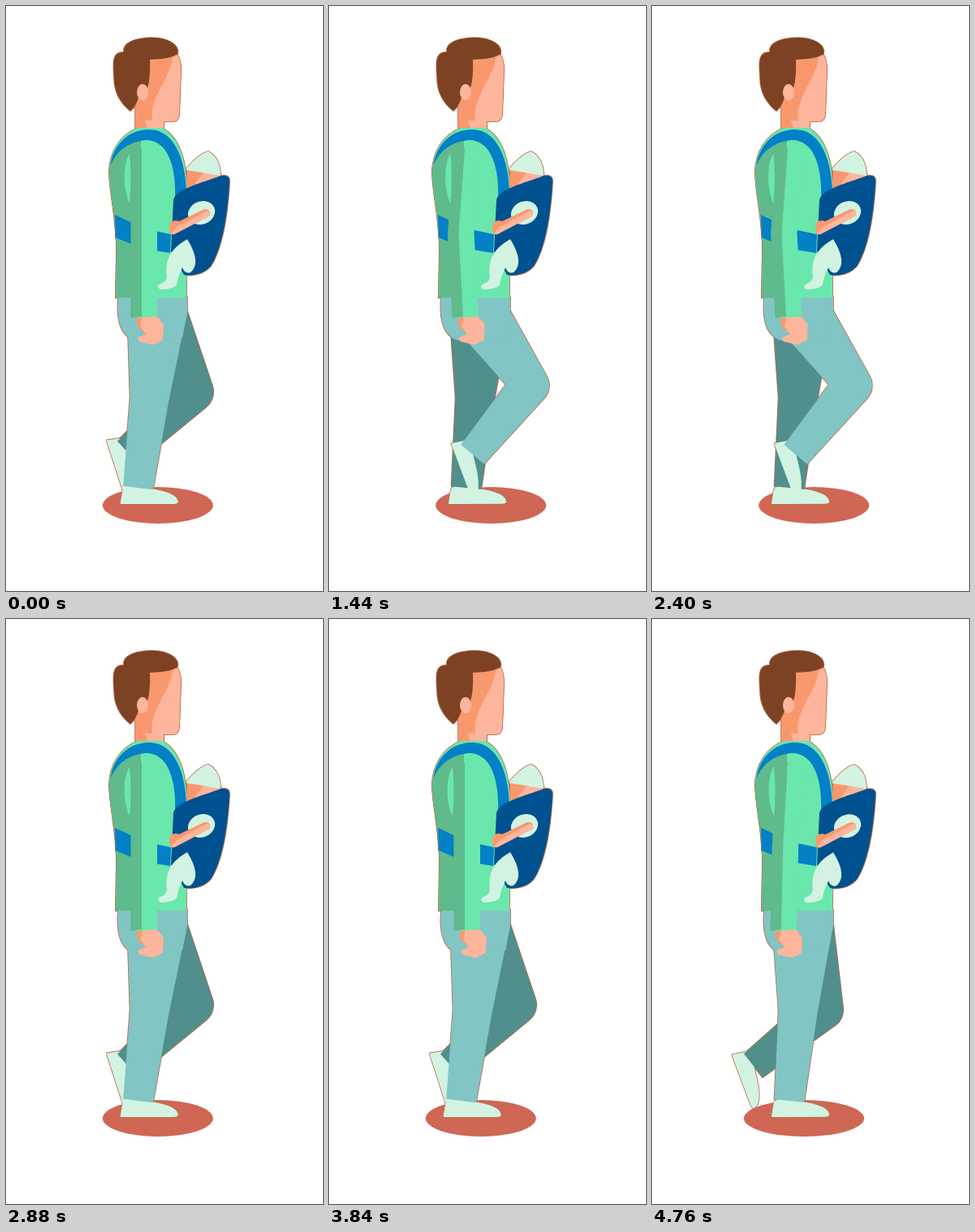
Recreate the animation shown at these times as an HTML page with a canvas. Size 390 px wide and 720 px high, loop 4.8 s.

```html
<!DOCTYPE html>
<html lang="en">
<head>
<meta charset="utf-8">
<title>Walking with a baby carrier</title>
<style>
html, body { margin: 0; width: 100%; height: 100%; overflow: hidden; background: #fff; }
canvas { display: block; }
</style>
</head>
<body>
<canvas id="stage" width="390" height="720"></canvas>
<script>
const ctx = document.getElementById('stage').getContext('2d');
const CYCLE = 960, STEP = 40;
const HIP_X = 190, HIP_Y = 375, BONE = 109.2, KNEE = 24, ANKLE = 18.5;
const SKIN = '#fdb59c', SKIN_SHADE = '#f9986d', HAIR = '#7d4224';
const GREEN = '#6ae7ac', GREEN_SHADE = '#5fba8c', MINT = '#d2f3e2';
const STRAP = '#0380c6', NAVY = '#00518f', TROUSERS = '#81c5c4', TROUSERS_SHADE = '#508f8c';
const FLOOR = '#cf6754', EDGE = '#b9714f';
const { sin, cos, max, sqrt, hypot, PI } = Math;

const shape = (color, d) => ({ color, path: new Path2D(d) });
const oval = (color, x, y, rx, ry, turn = 0) => {
  const path = new Path2D();
  path.ellipse(x, y, rx, ry, turn, 0, 2 * PI);
  return { color, path };
};
const moved = (item, matrix) => {
  const path = new Path2D();
  path.addPath(item.path, matrix);
  return { color: item.color, path };
};

const shoe = shape(MINT, 'M-22 19L-19 2Q-16-2-12-2L14 1Q46 5 49 16Q50 20 43 20H-20Q-22 20-22 19Z');

const pelvis = shape(TROUSERS, 'M138 358H223V378L217 408L167 413Q133 411 138 358Z');

const torso = [
  shape(GREEN, 'M162 150C140 159 127 180 127 205C128 235 136 260 136 300L135 359H222V240C225 190 212 160 192 150Z'),
  shape(GREEN_SHADE, 'M166 156C140 163 127 182 127 205C128 235 136 260 136 300L135 359H166Z'),
  shape(STRAP, 'M134 257L166 272V298L135 285Z'),
  shape(STRAP, 'M165 273L203 281L202 304L165 298Z'),
  shape(STRAP, 'M129 196C131 172 150 152 176 152C206 152 223 187 222 240H208C210 195 198 165 172 165C152 167 136 177 129 196Z')
];

const head = [
  shape(SKIN_SHADE, 'M158 70L207 58Q215 65 215 78L213 134Q212 142 205 142H194V151Q177 153 159 150V122Z'),
  shape(SKIN, 'M205 64L211 60Q215 66 215 78L213 134Q212 142 205 142H194V151L174 150L171 141H180C176 112 201 92 205 64Z'),
  shape(HAIR, 'M153 129C139 118 133 103 133 88C133 77 128 56 145 57C143 45 160 39 180 39C199 39 214 48 211 59C200 66 187 65 177 66Q178 88 174 101L163 112Q161 122 153 129Z'),
  oval(SKIN, 168, 106, 7, 10)
];

const baby = [
  shape(SKIN_SHADE, 'M223 200L264 207L250 225H222Z'),
  shape(SKIN, 'M243 205L264 207L250 225H228Z'),
  shape(MINT, 'M222 200Q238 181 249 179Q264 187 264 209Q244 205 222 202Z'),
  shape(NAVY, 'M206 238C210 225 240 218 264 209Q276 207 275 217C273 251 267 297 252 320Q241 333 219 331L203 302Z'),
  oval(MINT, 240.5, 254.5, 17, 14, -0.4),
  shape(SKIN_SHADE, 'M202 267Q207 262 213 265L244 250Q252 249 251 258L207 281Q199 283 202 267Z'),
  shape(SKIN, 'M203 280L210 272L247 252Q252 252 251 258L207 281Z'),
  shape(MINT, 'M223 287Q241 316 227 328Q220 330 217 322Q211 334 210 343Q207 348 190 349Q184 345 190 342Q197 340 198 333C195 310 205 297 223 287Z')
];

const hand = [
  shape(SKIN, 'M164 382L184 380L194 392L193 411L181 417L164 413L162 408L172 404L164 394Z'),
  shape(SKIN_SHADE, 'M160 382H168L165 394L172 404L162 395Z')
];

const highlight = shape(GREEN, 'M152 182C144 192 143 225 152 243Q155 210 152 182Z');

// Smooth hump of the stride, peaking at the given angle in degrees.
const lobe = (angle, peak, stretch) => max(0, cos(stretch * (angle - peak * PI / 180)));

// Ankle position and foot tilt; angle runs from 0 to 2 PI, mid-stance at 0.
function ankle(angle) {
  return {
    x: 166 - 64 * sin(angle) - 7 * cos(angle) + 20 * sin(2 * angle) + 3.6 * cos(2 * angle),
    y: 593 - 44 * lobe(angle, 160, 0.86) ** 1.5,
    tilt: 72 * lobe(angle, 165, 1) - 15 * max(0, -sin(angle)) ** 3
  };
}

function leg(angle, color) {
  const { x, y, tilt } = ankle(angle);
  const dx = x - HIP_X, dy = y - HIP_Y, reach = hypot(dx, dy);
  const bend = sqrt(max(0, BONE ** 2 - reach ** 2 / 4)) / reach;
  const kx = HIP_X + dx / 2 + dy * bend, ky = HIP_Y + dy / 2 - dx * bend;

  const normal = (vx, vy) => [vy / hypot(vx, vy), -vx / hypot(vx, vy)];
  const [tx, ty] = normal(kx - HIP_X, ky - HIP_Y), [sx, sy] = normal(x - kx, y - ky);
  const miter = 2 * KNEE / ((tx + sx) ** 2 + (ty + sy) ** 2);
  const mx = (tx + sx) * miter, my = (ty + sy) * miter;
  const ux = sx * ANKLE, uy = sy * ANKLE;

  const path = new Path2D();
  path.moveTo(223, HIP_Y);
  path.arcTo(kx + mx, ky + my, x + ux, y + uy, KNEE);
  path.lineTo(x + ux, y + uy);
  path.lineTo(x - ux, y - uy);
  path.lineTo(kx - mx, ky - my);
  path.lineTo(150 + max(0, kx - 180) * 0.18, 404);
  path.closePath();

  const place = new DOMMatrix().translate(x, y).rotate(tilt);
  return [moved(shoe, place), { color, path }];
}

function arm(angle) {
  const elbow = -3.75 + 3.75 * cos(angle) + 22 * sin(angle);
  const cuff = -1 + cos(angle) + 31 * sin(angle);
  const sleeve = (color, left, right) => shape(color,
    `M${left} 176H${right}L${right + elbow} 280L${right + cuff} 382L${left + cuff} 384L${left + elbow} 280Z`);
  const shifted = (item, dx) => moved(item, new DOMMatrix().translate(dx, 0));
  return [
    ...hand.map(part => shifted(part, cuff * 1.1)),
    sleeve(GREEN, 160, 186),
    sleeve(GREEN_SHADE, 153.5, 167),
    shifted(highlight, elbow / 3)
  ];
}

function draw(time) {
  const angle = time % CYCLE / CYCLE * 2 * PI;
  const spread = sin(angle - 0.065) ** 2;
  const babyDrop = new DOMMatrix().translate(0, 3 * spread);
  const figure = [
    ...leg((angle + 11 / 12 * PI) % (2 * PI), TROUSERS_SHADE),
    ...leg(angle, TROUSERS),
    pelvis,
    ...head,
    ...torso,
    ...baby.map(part => moved(part, babyDrop)),
    ...arm(angle)
  ];

  ctx.fillStyle = '#fff';
  ctx.fillRect(0, 0, 390, 720);
  ctx.fillStyle = FLOOR;
  ctx.fill(oval(FLOOR, 193 - 6.2 * cos(angle), 614.5, 67.7 + 62 * spread, 22.5).path);

  // Thin outline around the whole silhouette.
  ctx.strokeStyle = EDGE;
  ctx.lineWidth = 1.7;
  for (const { path } of figure) ctx.stroke(path);
  for (const { color, path } of figure) {
    ctx.fillStyle = color;
    ctx.fill(path);
  }
}

const start = performance.now();
function tick() {
  draw(Math.floor((performance.now() - start) / STEP) * STEP);
  requestAnimationFrame(tick);
}
tick();
</script>
</body>
</html>
```
